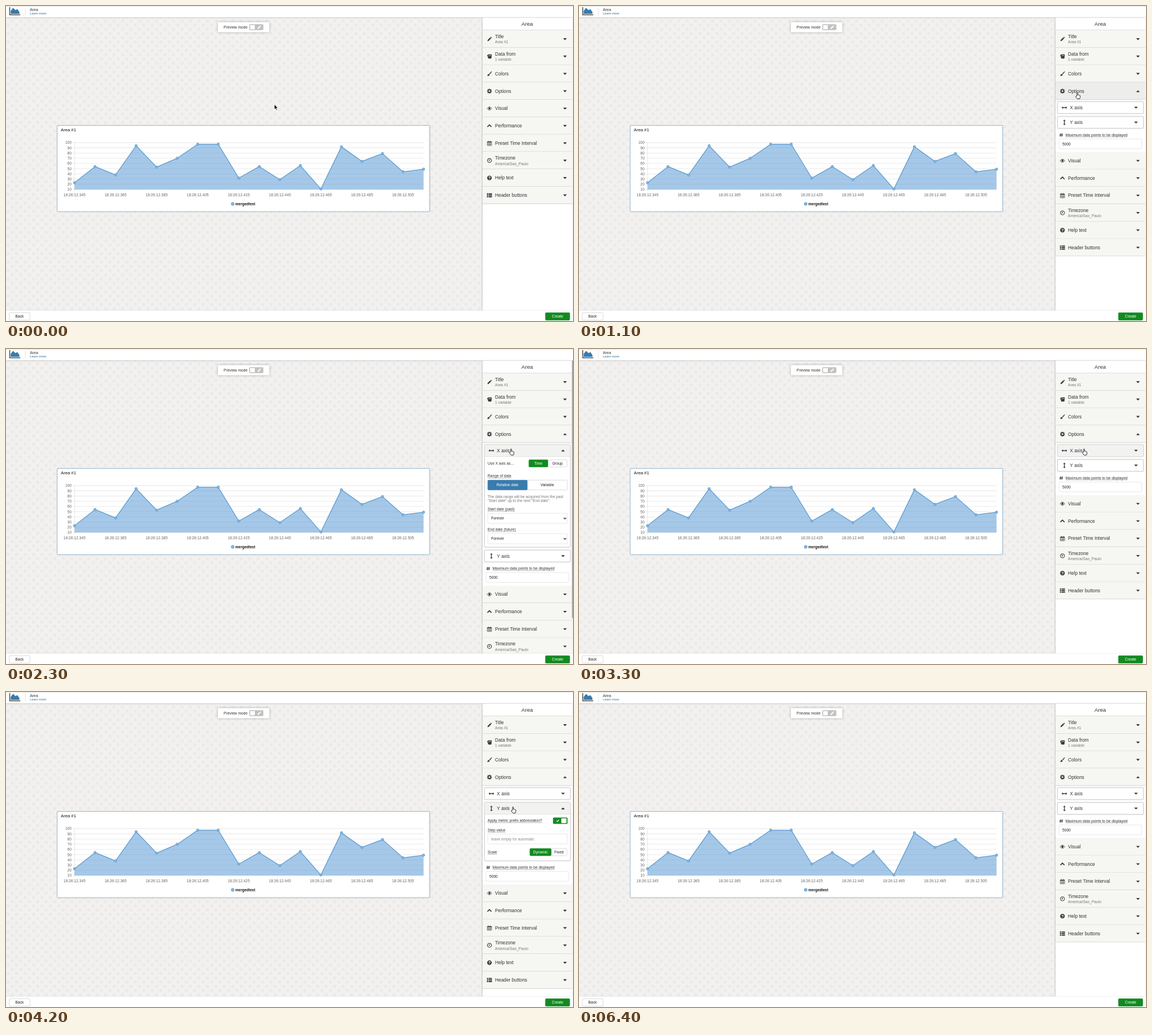
An HTML page with a canvas that plays this animation: 1003x558 px, repeating every 6.7 s.

```html
<!DOCTYPE html>
<html lang="en">
<head>
<meta charset="utf-8">
<title>Area widget editor</title>
<style>
html, body { margin: 0; width: 100%; height: 100%; overflow: hidden; background: #fff; }
canvas { display: block; }
</style>
</head>
<body>
<canvas id="stage" width="1003" height="558"></canvas>
<script>
const ctx = document.getElementById('stage').getContext('2d');
const LOOP = 6700;
const INK = '#333', GREY = '#777', LINE = '#d2d2d0', GREEN = '#128a20', BLUE = '#397cad';
const SMALL = 6.66, MEDIUM = 8.33;

// Stepped tracks: [start time, values...]
const cursorTrack = [
  [0, 474.5, 174], [100, 678.5, 197], [300, 715, 191], [400, 775, 184], [500, 816.5, 178.5],
  [700, 848, 168], [800, 873, 157], [900, 881.5, 153.5], [1300, 879.5, 153.5],
  [1800, 882, 157], [1900, 887, 166], [2000, 891, 174], [2100, 893.5, 177],
  [3600, 894, 184], [3700, 895.5, 196], [3800, 896.8, 203.5],
  [5900, 880, 199], [6000, 760, 171], [6100, 470, 103], [6200, 190, 38], [6300, 50.5, 5.5], [6400, -50, -50]
];
const optionsTrack = [[0, 0], [1000, .55], [1100, 1]];
const xTrack = [[0, 0], [2300, 1], [3200, .5], [3300, 0]];
const yTrack = [[0, 0], [4100, .5], [4200, 1], [5100, .5], [5200, 0]];
const at = (track, time) => track.filter(key => key[0] <= time).pop().slice(1);

// Icons on a 10 x 10 grid: [filled path, stroked path, stroke width]
const icons = {
  pencil: ['M1 9.2 1.6 6.6 6.3 1.9 8.3 3.9 3.6 8.6ZM6.9 1.3 7.5.7Q8 .3 8.5.8L9.4 1.7Q9.9 2.2 9.5 2.7L8.9 3.3Z'],
  data: ['M2.5 1 9 .8 9.8 3.8 9.1 4.2V8Q9 9.5 6 9.5L3.5 9.3Q2 9 2 7.5V5.5L.2 3.5ZM3 3.2V4.2L8.3 3.4V2.5Z'],
  brush: ['M9.6.4Q10 1 9.4 1.8L6 6 4.6 4.7 8.4.7Q9-.1 9.6.4ZM4 5.3 5.4 6.6Q5.6 9 3 9.3 1.3 9.5.3 8.5 1.5 8.2 1.7 7 2 5.3 4 5.3Z'],
  cog: ['M4.2 0H5.8V10H4.2ZM0 4.2H10V5.8H0Z', 'M5 2.4a2.6 2.6 0 1 0 .01 0ZM1.6 1.6 3.2 3.2M8.4 1.6 6.8 3.2M1.6 8.4 3.2 6.8M8.4 8.4 6.8 6.8', 1.9],
  eye: ['M5 2.8a2.1 2.1 0 1 0 .01 0Z', 'M.3 5Q5-1.4 9.7 5 5 11.4.3 5Z', .9],
  chevron: ['', 'M1 7 5 3 9 7', 1.9],
  calendar: ['M.8 2H9.2V3.8H.8Z', 'M.8 2H9.2V9.6H.8ZM.8 6.7H9.2M3.6 4V9.6M6.4 4V9.6M3 .2V2.4M7 .2V2.4', .8],
  clock: ['', 'M5 1a4 4 0 1 0 .01 0ZM5 2.8V5.3H3.4', 1.2],
  help: ['M5 .5a4.5 4.5 0 1 0 .01 0Z'],
  list: ['M0 1H2.6V3.2H0ZM3.4 1H10V3.2H3.4ZM0 4H2.6V6.2H0ZM3.4 4H10V6.2H3.4ZM0 7H2.6V9.2H0ZM3.4 7H10V9.2H3.4Z'],
  across: ['M-.2 5 2.4 2.6V4.3H7.6V2.6L10.2 5 7.6 7.4V5.7H2.4V7.4Z'],
  upright: ['M5-.2 2.6 2.4H4.3V7.6H2.6L5 10.2 7.4 7.6H5.7V2.4H7.4Z'],
  hash: ['', 'M3.7 1 2.5 9M7.5 1 6.3 9M1.2 3.6H9.2M.8 6.4H8.8', 1.3],
  check: ['', 'M1 5.4 3.8 8.2 9 2', 2]
};
const arrowShape = new Path2D('M0 0V9.5L2.2 7.5 3.8 11 5.4 10.3 3.9 7H6.8Z');
const handShape = new Path2D('M-.8 6V1Q-.8 0 0 0T.8 1V4.1Q1.7 3.6 2.3 4.4 3.2 4 3.7 4.8 4.8 4.5 5 5.6V8.2L4.1 11H0L-2.9 7.3Q-3.2 6.2-2 6.2Z');

function text(str, x, y, { size = SMALL, color = INK, align = 'left', weight = '', underline } = {}) {
  ctx.font = `${weight} ${size}px "Liberation Sans", Arial, sans-serif`;
  ctx.textAlign = align;
  ctx.fillStyle = color;
  const base = y + size * .36;
  ctx.fillText(str, x, base);
  if (underline) rect(x, base + 1, ctx.measureText(str).width, .6, '#777');
}

function rect(x, y, w, h, fill, stroke, radius = 0) {
  ctx.beginPath();
  ctx.roundRect(x, y, w, h, radius);
  if (fill) { ctx.fillStyle = fill; ctx.fill(); }
  if (stroke) { ctx.strokeStyle = stroke; ctx.lineWidth = .7; ctx.stroke(); }
}

function shadowed(color, blur, draw) {
  ctx.save();
  ctx.shadowColor = color;
  ctx.shadowBlur = blur;
  draw();
  ctx.restore();
}

function clipped(x, y, w, h, draw) {
  ctx.save();
  ctx.beginPath();
  ctx.rect(x, y, w, h);
  ctx.clip();
  draw();
  ctx.restore();
}

function icon(name, cx, cy, size = 9, color = '#3c3c3c') {
  const [fill, stroke, width] = icons[name];
  ctx.save();
  ctx.translate(cx - size / 2, cy - size / 2);
  ctx.scale(size / 10, size / 10);
  ctx.fillStyle = ctx.strokeStyle = color;
  ctx.lineWidth = width || 1;
  if (name === 'cog') {
    ctx.fill(new Path2D('M4.1.2H5.9V2.5H4.1ZM4.1 7.5H5.9V9.8H4.1ZM.2 4.1H2.5V5.9H.2ZM7.5 4.1H9.8V5.9H7.5Z'));
  } else {
    ctx.fill(new Path2D(fill), 'evenodd');
  }
  if (stroke) ctx.stroke(new Path2D(stroke));
  ctx.restore();
}

function caret(x, y, open) {
  const d = open ? -1 : 1;
  ctx.fillStyle = INK;
  ctx.beginPath();
  ctx.moveTo(x - 3.3, y - 1.6 * d);
  ctx.lineTo(x + 3.3, y - 1.6 * d);
  ctx.lineTo(x, y + 1.8 * d);
  ctx.fill();
}

function makeTexture() {
  const tile = document.createElement('canvas');
  tile.width = tile.height = 15;
  const g = tile.getContext('2d');
  g.fillStyle = '#f2f1f0';
  g.fillRect(0, 0, 15, 15);
  g.fillStyle = '#ebeae9';
  for (const p of [1, 8.5]) {
    g.beginPath();
    g.roundRect(p, p, 5.5, 5.5, 1.5);
    g.fill();
  }
  return ctx.createPattern(tile, 'repeat');
}
const texture = makeTexture();

function drawChart() {
  shadowed('rgba(0,0,0,.15)', 3, () => rect(90.5, 211.5, 659, 153, '#fff'));
  ctx.setLineDash([2, 1]);
  rect(90.5, 211.5, 659, 152.6, null, '#2f6f9f', 1);
  ctx.setLineDash([]);
  text('Area #1', 97, 219.7, { size: 7.7, color: '#111' });

  const values = [23, 54, 38, 94, 53, 70, 97, 97, 32, 54, 29, 56, 11, 92, 64, 79, 44, 49];
  const px = i => 121.2 + i * 36.32;
  const py = v => 325 - (v - 10) * .922;
  for (let v = 10; v <= 100; v += 10) {
    rect(118, py(v) - .4, 620.6, .8, '#e4e4e4');
    text(v, 116, py(v), { align: 'right', color: '#666' });
  }
  rect(120.8, 242, .8, 86, '#e0e0e0');
  for (let i = 0; i < 9; i++)
    text('18:26:12.' + (345 + i * 20), px(i * 2), 334.3, { align: 'center', color: '#666' });

  const trace = new Path2D();
  values.forEach((v, i) => trace.lineTo(px(i), py(v)));
  const area = new Path2D(trace);
  area.lineTo(px(17), 325);
  area.lineTo(px(0), 325);
  ctx.fillStyle = 'rgba(91,155,213,.55)';
  ctx.fill(area);
  ctx.strokeStyle = '#5b9bd0';
  ctx.lineWidth = 1.3;
  ctx.lineJoin = 'round';
  ctx.stroke(trace);
  ctx.lineJoin = 'miter';
  const dot = (x, y, r) => {
    ctx.beginPath();
    ctx.arc(x, y, r, 0, 7);
    ctx.fillStyle = '#86b5e0';
    ctx.fill();
    ctx.strokeStyle = '#5b9bd0';
    ctx.lineWidth = .8;
    ctx.stroke();
  };
  values.forEach((v, i) => dot(px(i), py(v), 2.2));
  dot(401, 350.5, 2.7);
  text('mergedtest', 405.8, 350.3, { size: 6.5, weight: 'bold', color: '#111' });
}

function drawFrame() {
  ctx.fillStyle = texture;
  ctx.fillRect(0, 0, 1003, 558);
  shadowed('rgba(0,0,0,.3)', 3, () => rect(0, 0, 1003, 20, '#fff'));
  rect(0, 0, 1003, .8, '#ddd');
  ctx.fillStyle = BLUE;
  ctx.fill(new Path2D('M8.3 14V8.5L12.6 3.2 16.6 7.3 20.3 5.4 23.8 11V14Z'));
  ctx.strokeStyle = '#333';
  ctx.lineWidth = 1.3;
  ctx.stroke(new Path2D('M6.6 2V15.7H25.3'));
  rect(33.8, 2, .8, 15, '#ddd');
  text('Area', 42.3, 7, { size: 6.8 });
  text('Learn more', 42.3, 13.4, { size: 5.65, color: '#2d6d9c' });

  shadowed('rgba(0,0,0,.3)', 4, () => rect(374.8, 28.5, 91, 18, '#fff', null, 1));
  text('Preview mode', 385, 37.5);
  rect(430.8, 32.8, 24, 9.4, '#c2c2c2', '#b5b5b5', 1);
  rect(431.4, 33.3, 9.2, 8.4, '#fff', '#b5b5b5', 1);
  icon('pencil', 447.8, 37.5, 7.5, '#fff');
}

function button(label, x, y, w, h, fill) {
  rect(x, y, w, h, fill || '#fff', fill || '#ccc', 1.5);
  text(label, x + w / 2, y + h / 2, { align: 'center', color: fill ? '#fff' : '#222' });
}

function field(label, x, y, w, h, color = '#222') {
  rect(x, y, w, h, '#fff', '#ddd', 1);
  text(label, x + 6, y + h / 2, { color });
}

function select(label, y) {
  field(label, 852.3, y, 140.5, 18);
  ctx.strokeStyle = '#222';
  ctx.lineWidth = 1.1;
  ctx.stroke(new Path2D(`M986.6 ${y + 8}l2.2 2.2 2.2-2.2`));
}

function drawRow(name, title, sub, top, hover, open) {
  const mid = top + 15.4;
  rect(843, top, 159, 30.7, hover ? '#ededeb' : '#f6f6f3');
  rect(843, top + 30, 159, .9, LINE);
  icon(name, 855.2, mid);
  if (name === 'help') text('?', 855.2, mid, { size: 7.5, weight: 'bold', color: '#fff', align: 'center' });
  text(title, 865, sub ? mid - 4.6 : mid - .2, { size: MEDIUM });
  if (sub) text(sub, 865, mid + 5.5, { color: GREY });
  caret(988.8, mid + .2, open);
}

function drawBox(name, title, top, bodyHeight, open, hover, body) {
  shadowed('rgba(0,0,0,.15)', 2, () => rect(846.4, top, 152, 21 + bodyHeight, '#fff', '#c9c9c9', 1));
  if (hover) rect(846.8, top + .4, 151.2, 20.4, '#f2f2f1');
  icon(name, 858.6, top + 10.6, 9.5);
  text(title, 868.3, top + 10.4, { size: MEDIUM });
  caret(985.3, top + 10.6, open);
  if (!bodyHeight) return;
  rect(846.8, top + 20.6, 151.2, .7, '#ddd');
  clipped(846, top + 21, 153, bodyHeight, body);
}

function xBody() {
  text('Use X axis as...', 852, 202.7);
  button('Group', 958.5, 196.2, 33.8, 12.8);
  button('Time', 925, 196.2, 33.5, 12.8, GREEN);
  text('Range of data', 852, 225, { underline: true });
  button('Variable', 922, 232.3, 70.8, 17.4);
  button('Relative date', 852.3, 232.3, 69.7, 17.4, BLUE);
  text('The data range will be acquired from the past', 852, 261.6, { color: GREY });
  text('"Start date" up to the next "End date".', 852, 268.7, { color: GREY });
  text('Start date (past)', 852, 284, { underline: true });
  select('Forever', 291);
  text('End date (future)', 852, 320, { underline: true });
  select('Forever', 327);
}

function yBody(shift) {
  ctx.translate(0, shift);
  text('Apply metric prefix abbreviation?', 852, 228, { underline: true });
  rect(968, 222.8, 25, 10.4, GREEN, GREEN, 1);
  rect(982.3, 223.8, 9.2, 8.4, '#fff', null, 1);
  icon('check', 976, 228, 5.5, '#fff');
  text('Step value', 852, 244.8, { underline: true });
  field('leave empty for automatic', 852.3, 251.6, 140.5, 17.5, '#888');
  text('Scale', 852, 283.8, { underline: true });
  button('Fixed', 964.3, 277.2, 27.8, 12.8);
  button('Dynamic', 926.8, 277.2, 37.5, 12.8, GREEN);
}

function drawSidebar(time, cx, cy) {
  const [options] = at(optionsTrack, time), [x] = at(xTrack, time), [y] = at(yTrack, time);
  const xHeight = 160.5 * x, yHeight = 82.3 * y;
  const bodyHeight = options * (92.6 + xHeight + yHeight);
  const over = (top, height) => cx > 843 && cy >= top && cy < top + height;

  shadowed('rgba(0,0,0,.35)', 3, () => rect(843, 20.5, 160, 520, '#fff'));
  rect(843, 20, 160, .8, '#ddd');
  text('Area', 922, 31.6, { size: 9.7, align: 'center' });
  rect(843, 42.3, 159, .8, LINE);

  const rows = [
    ['pencil', 'Title', 'Area #1'], ['data', 'Data from', '1 variable'], ['brush', 'Colors'],
    ['cog', 'Options'], ['eye', 'Visual'], ['chevron', 'Performance'], ['calendar', 'Preset Time Interval'],
    ['clock', 'Timezone', 'America/Sao_Paulo'], ['help', 'Help text'], ['list', 'Header buttons']
  ];
  rows.forEach(([name, title, sub], i) => {
    const top = 43.1 + i * 30.75 + (i > 3 ? bodyHeight : 0);
    drawRow(name, title, sub, top, over(top, 30.7), i === 3 && options > 0);
  });

  if (bodyHeight) clipped(843, 166.2, 160, bodyHeight - .4, () => {
    const yTop = 195.7 + xHeight, shift = xHeight + yHeight;
    drawBox('across', 'X axis', 169.4, xHeight, x === 1, over(169, 21), xBody);
    drawBox('upright', 'Y axis', yTop, yHeight, y === 1, over(yTop, 21), () => yBody(xHeight));
    icon('hash', 853, 228.5 + shift, 7.5);
    text('Maximum data points to be displayed', 860.4, 228.3 + shift, { underline: true });
    field('5000', 849, 235.6 + shift, 146.5, 17.3);
  });
  rect(1001.6, 20, 1.4, 519, '#f4f4f4');
  if (x === 1) rect(1001.2, 20.5, 1.8, 456, '#a3a3a3');
}

function drawFooter() {
  shadowed('rgba(0,0,0,.25)', 3, () => rect(0, 539.5, 1003, 19, '#fff'));
  button('Back', 5.6, 543.3, 36.8, 13.2);
  button('Create', 954.2, 543.3, 43, 13.2, GREEN);
}

function drawCursor(x, y) {
  const hand = x > 846;
  ctx.save();
  ctx.translate(x, y);
  ctx.lineJoin = 'round';
  ctx.lineWidth = .9;
  ctx.fillStyle = hand ? '#fff' : '#111';
  ctx.strokeStyle = hand ? '#111' : '#fff';
  const shape = hand ? handShape : arrowShape;
  ctx.fill(shape);
  ctx.stroke(shape);
  ctx.restore();
}

function render(now) {
  const time = now % LOOP;
  const [x, y] = at(cursorTrack, time);
  drawFrame();
  drawChart();
  drawSidebar(time, x, y);
  drawFooter();
  drawCursor(x, y);
  requestAnimationFrame(render);
}
requestAnimationFrame(render);
</script>
</body>
</html>
```
